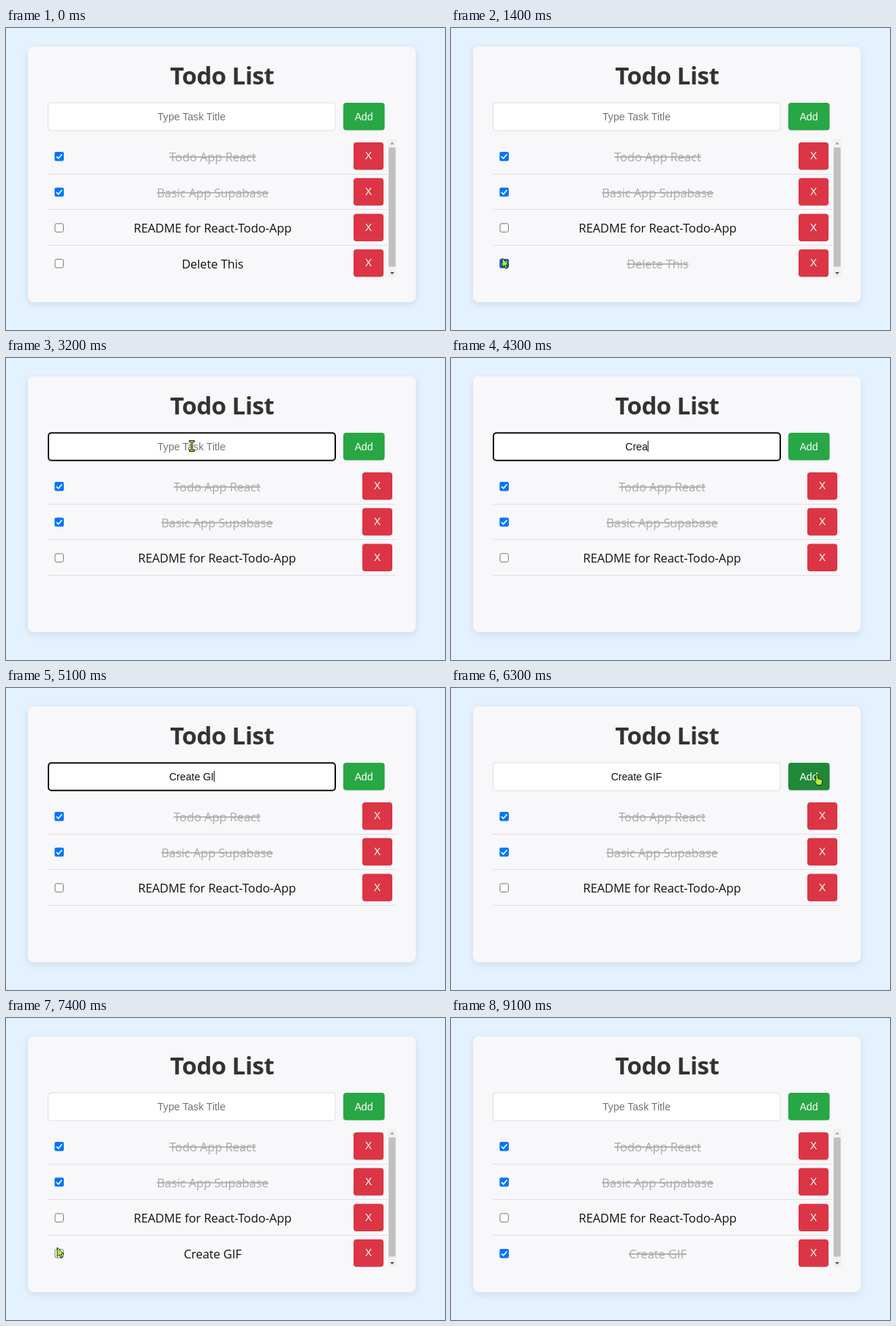
Animation, 600 px wide and 412 px high, one loop 10000 ms. Source, as an HTML page:

```html
<!DOCTYPE html>
<html lang="en">
<head>
<meta charset="utf-8">
<title>Todo List</title>
<style>
  html, body { margin: 0; width: 100%; height: 100%; overflow: hidden; background: #e4f1fe; }
  svg { display: block; width: 600px; height: 412px; }
  text { text-anchor: middle; white-space: pre; }
  .title { font: 700 33px "Open Sans", "Noto Sans", sans-serif; letter-spacing: -.5px; fill: #333; }
  .task { font: 16.5px "Open Sans", "Noto Sans", sans-serif; letter-spacing: -.08px; fill: #111; }
  .done { fill: #aaa; text-decoration: line-through; }
  .ui { font: 14.1px "Liberation Sans", Arial, sans-serif; }
  .white { fill: #fff; }
  .pointer { fill: #b2f034; stroke: #1c2a10; stroke-width: 1; stroke-linejoin: round; }
  .card { filter: drop-shadow(0 3px 5px rgba(40, 70, 110, .12)); }
</style>
</head>
<body>
<svg viewBox="0 0 600 412" xmlns="http://www.w3.org/2000/svg">
  <rect width="600" height="412" fill="#e4f1fe"/>
  <rect class="card" x="30" y="25" width="530" height="349" rx="8" fill="#f8f7fa"/>
  <text class="title" x="295.3" y="77">Todo List</text>
  <g id="form"></g>
  <g id="list"></g>
  <g id="pointer" class="pointer"></g>
</svg>
<script>
const LOOP = 10000, STEP = 100;
const ROW_TOP = 150.7, ROW_H = 48.7;
const NEW_TASK = "Create GIF";
const KEY_TIMES = [3700, 3800, 3900, 4300, 4400, 4500, 4700, 4900, 5100, 5200];

const CHECK_OLD = 1100, REMOVE = 2700, FOCUS = 3200, BLUR = 6200, ADD = 6600, CHECK_NEW = 7800;

// Each move: start, end, from, to
const MOVES = [
  [0, 600, [200, 180], [70, 314]],
  [1600, 2200, [70, 314], [498, 323]],
  [2600, 3100, [498, 323], [254, 120]],
  [5600, 6100, [254, 120], [500, 118]],
  [6700, 7400, [500, 118], [70, 313]],
  [7800, 8000, [70, 313], [92, 430]]
];
const SHAPES = {
  arrow: "M0 0V12.5L3 9.8 5 14.5 7.2 13.5 5.2 9H9.2Z",
  hand: "M-1.3 1Q0-.9 1.3 1V5.5L6 6.8Q8 7.4 7.6 10L6.5 14.5H.3L-3.2 9.3Q-2.8 7.3-1.3 8.6Z",
  beam: "M-3.5-7.5H3.5V-5.5H1V5.5H3.5V7.5H-3.5V5.5H-1V-5.5H-3.5Z"
};

const form = document.getElementById("form");
const list = document.getElementById("list");
const pointer = document.getElementById("pointer");

const between = (t, a, b) => t >= a && t < b;
const inside = (p, x, y, w, h) => !!p && p[0] >= x && p[0] <= x + w && p[1] >= y && p[1] <= y + h;
const ease = p => p * p * (3 - 2 * p);
const box = (x, y, w, h, r, fill, extra = "") =>
  `<rect x="${x}" y="${y}" width="${w}" height="${h}" rx="${r}" fill="${fill}" ${extra}/>`;
const label = (cls, x, y, s) => `<text class="${cls}" x="${x}" y="${y}">${s}</text>`;

function pointerAt(t) {
  if (!between(t, 100, 3700) && !between(t, 5700, 8000)) return null;
  const [start, end, from, to] = MOVES.filter(m => m[0] <= t).pop();
  const p = ease(Math.min(1, (t - start) / (end - start)));
  return from.map((v, i) => v + (to[i] - v) * p);
}

function tasksAt(t) {
  const tasks = [
    { name: "Todo App React", done: true },
    { name: "Basic App Supabase", done: true },
    { name: "README for React-Todo-App", done: false }
  ];
  if (t < REMOVE) tasks.push({ name: "Delete This", done: t >= CHECK_OLD });
  if (t >= ADD) tasks.push({ name: NEW_TASK, done: t >= CHECK_NEW });
  return tasks;
}

function drawForm(t, p) {
  const focused = between(t, FOCUS, BLUR);
  const keys = KEY_TIMES.filter(k => k <= t);
  const typed = t < ADD ? NEW_TASK.slice(0, keys.length) : "";
  const hot = inside(p, 461, 102, 56.5, 38);
  form.innerHTML =
    (focused
      ? box(58, 102.2, 392, 37.6, 4, "#fff", 'stroke="#101010" stroke-width="2"')
      : box(57.5, 102, 392.5, 38, 4, "#fff", 'stroke="#dddde1"')) +
    `<text id="entry" class="ui" x="253.5" y="126" fill="${typed ? "#111" : "#757575"}">${typed || "Type Task Title"}</text>` +
    box(461, 102, 56.5, 37.6, 4, hot ? "#218838" : "#28a745") +
    label("ui white", 489, 126, "Add");

  const lastKey = keys.length ? keys[keys.length - 1] : FOCUS;
  if (focused && (t - lastKey) % 1060 < 530) {
    const half = typed ? document.getElementById("entry").getComputedTextLength() / 2 : 0;
    form.innerHTML += box(253.5 + half, 113, 1, 15, 0, "#111");
  }
}

function checkbox(y, done, hot) {
  if (!done) return box(67, y - 5.5, 11.4, 11.4, 2, "#fff", `stroke="${hot ? "#4f4f4f" : "#767676"}"`);
  return box(66.4, y - 6, 12.6, 12.4, 2, hot ? "#005cc8" : "#0075ff") +
    `<path d="M69 ${y + .4}l2.6 2.6 4.9-5.7" fill="none" stroke="#fff" stroke-width="1.7"/>`;
}

function drawList(t, p) {
  const tasks = tasksAt(t);
  const scrolls = tasks.length > 3;
  const right = scrolls ? 522 : 533;
  const buttonX = scrolls ? 475 : 487;
  const textX = scrolls ? 282.4 : 288.4;
  let out = "";
  tasks.forEach((task, i) => {
    const y = ROW_TOP + i * ROW_H;
    const hot = inside(p, buttonX, y + 5.3, 41, 37.5);
    out += checkbox(y + 24.3, task.done, inside(p, 66, y + 17, 13, 14)) +
      label(task.done ? "task done" : "task", textX, y + 31.3, task.name) +
      box(buttonX, y + 5.3, 41, 37.5, 4, hot ? "#c82333" : "#dc3545") +
      label("ui white", buttonX + 20.5, y + 28.6, "X");
    if (i < 3) out += box(57, Math.round(y + 48), right - 57, 1, 0, "#e1e1e5");
  });
  if (scrolls) {
    out += box(522, 151, 11.5, 189, 0, "#f1f1f1") +
      box(523, 163, 9.5, 162.5, 0, "#c1c1c1") +
      '<path d="M525 158.8l2.8-3.2 2.8 3.2z" fill="#a3a3a3"/>' +
      '<path d="M525 333l2.8 3.2 2.8-3.2z" fill="#505050"/>';
  }
  list.innerHTML = out;
  return buttonX;
}

function drawPointer(p, buttonX) {
  if (!p) return void (pointer.innerHTML = "");
  const overRow = [0, 1, 2, 3].some(i =>
    i < list.querySelectorAll(".task").length && inside(p, buttonX, ROW_TOP + 5.3 + i * ROW_H, 41, 37.5));
  const shape = overRow || inside(p, 461, 102, 56.5, 38) ? "hand"
    : inside(p, 57, 102, 393, 38) ? "beam" : "arrow";
  pointer.innerHTML = `<path transform="translate(${p[0]} ${p[1]})" d="${SHAPES[shape]}"/>`;
}

function draw(t) {
  const p = pointerAt(t);
  drawForm(t, p);
  drawPointer(p, drawList(t, p));
}

const began = performance.now();
let shown = -1;
function tick() {
  const t = Math.floor((performance.now() - began) % LOOP / STEP) * STEP;
  if (t !== shown) draw(shown = t);
  requestAnimationFrame(tick);
}
tick();
</script>
</body>
</html>
```
